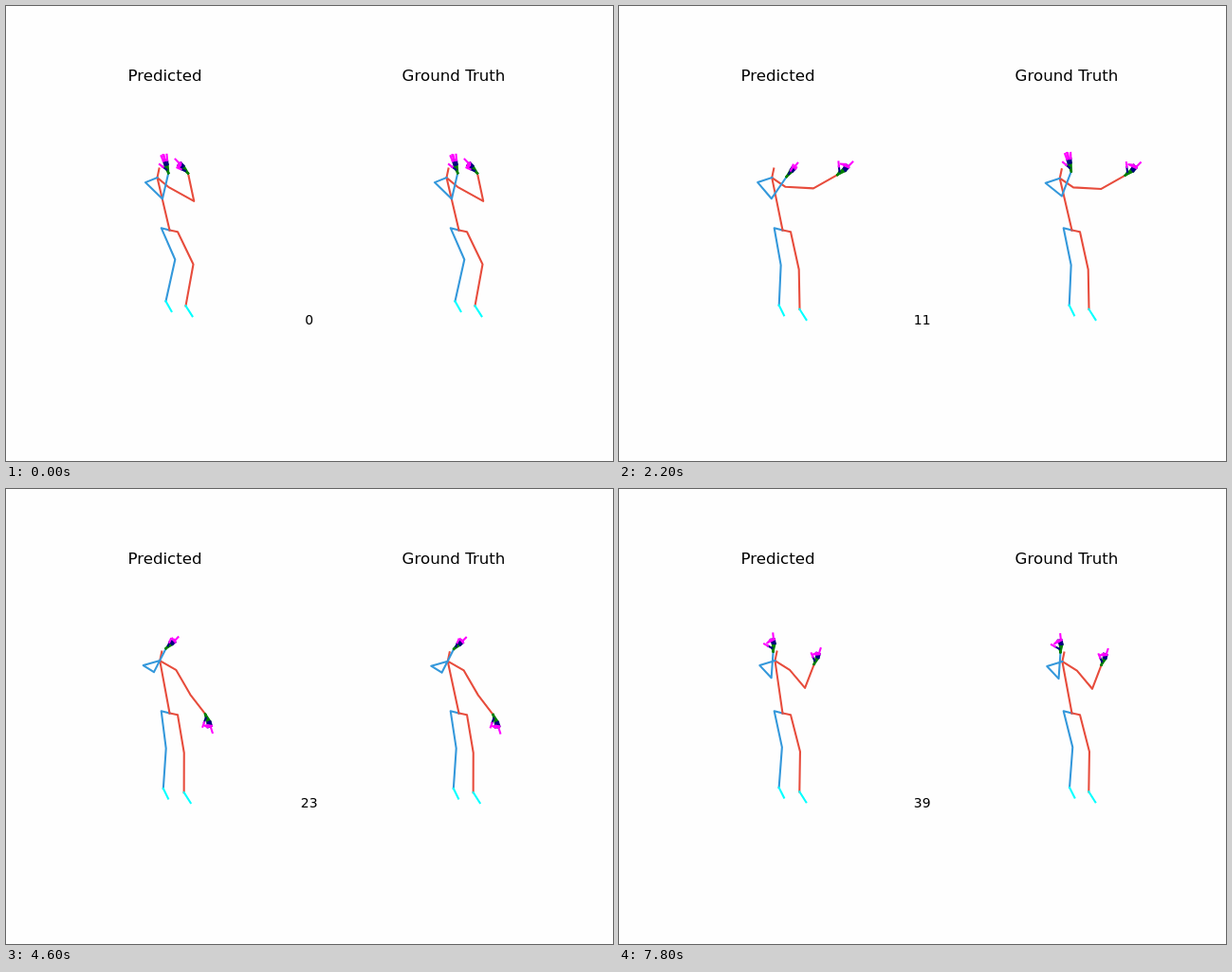
Recreate the animation shown at these times as an HTML page with a canvas. Size 640 px wide and 480 px high, loop 8 s.

```html
<!DOCTYPE html>
<html lang="en">
<head>
<meta charset="utf-8">
<title>Pose comparison</title>
<style>
html, body { margin: 0; width: 100%; height: 100%; overflow: hidden; background: #fefefe; }
canvas { display: block; }
</style>
</head>
<body>
<canvas id="stage" width="640" height="480"></canvas>
<script>
const ctx = document.getElementById("stage").getContext("2d");
const STEP = 200, STEPS = 40, PANEL_GAP = 305;
const RED = "#e74c3c", BLUE = "#3498db", CYAN = "#00ffff";
const GREEN = "#008000", NAVY = "#000080", MAGENTA = "#ff00ff";
const ROOT = [172, 236], RED_HIP = [180.5, 237.7], BLUE_HIP = [163.2, 233.7];

// Every motion below has one value per key step; angles are in degrees.
const KEY_STEPS = [0, 7, 15, 19, 27, 32, 39];
const body = {
  bend: [1, .05, .4, .35, 0, .2, .35],
  sway: [0, 1.5, .5, -2.5, -1.2, 0, .8],
  neck: [159, 160, 161.5, 162, 161.5, 160.3, 164],
  turn: [.1, .4, .7, 1, 1, 1, .75],
  drift: [0, 0, 1, 1, 0, .7, .7],
};
const redArm = {
  upper: [29, -20, 26, 60, 60, 45, 50],
  upperLen: [31, 31, 28, 30, 30, 29, 25],
  fore: [-102, -67, 8, 47, 58, -25, -69],
  foreLen: [30, 29, 29, 27, 25, 11, 27],
  hand: [-130, -61, -10, 61, 70, 60, -64],
  twist: [-.5, -1, -1.2, .8, .8, 2, -.9],
  reach: [1, 1, 1.1, 1.1, 1, .55, .9],
  open: 0,
};
const blueArm = {
  upper: [44, 39, 60, 69, -5, 44, 47],
  upperLen: [25, 22, 23, 14, 12.5, 19, 18],
  fore: [-77, -69, -42, -28, -98, -92, -86],
  foreLen: 28,
  hand: [-104, -101, 0, 8, -90, -92, -86],
  twist: [-.7, -.7, .4, .4, -1.4, -1.2, -1.2],
  reach: [1, 1, .85, 1, .75, .85, .95],
  open: [1, 1, 0, .7, 0, 0, 0],
};

function valueAt(track, step) {
  if (typeof track === "number") return track;
  let i = 0;
  while (i < KEY_STEPS.length - 2 && KEY_STEPS[i + 1] <= step) i++;
  const u = (step - KEY_STEPS[i]) / (KEY_STEPS[i + 1] - KEY_STEPS[i]);
  return track[i] + (track[i + 1] - track[i]) * u;
}

function sample(tracks, step) {
  const out = {};
  for (const name in tracks) out[name] = valueAt(tracks[name], step);
  return out;
}

const shift = ([x, y], dx, dy) => [x + dx, y + dy];
function polar([x, y], len, degrees) {
  const a = degrees * Math.PI / 180;
  return [x + len * Math.cos(a), y + len * Math.sin(a)];
}

function path(color, ...points) {
  ctx.strokeStyle = color;
  ctx.beginPath();
  for (const p of points) ctx.lineTo(...p);
  ctx.stroke();
}

function drawLeg(color, hip, knee, ankle, toe) {
  path(color, ROOT, hip, knee, ankle);
  path(CYAN, ankle, shift(ankle, ...toe));
}

// The middle fingers curl towards the thumb side; the index stays straight.
function drawHand(wrist, { hand, twist, reach, open }) {
  const at = (len, turn) => polar(wrist, len * reach, hand + turn);
  const curl = (1 - open) * twist;
  const fingers = [-1, 0, 1].map(k => [
    at(9, k * 10),
    at(13.5, k * 9 + curl * 6),
    at(11.5 + 8 * open, k * 9 + curl * 25),
  ]);
  fingers.push([at(9, 0), at(14, twist * 2), at(20, twist * 4)]);
  fingers.push([at(4, twist * 20), at(8.5, twist * 40), at(13, twist * 45)]);
  for (const [palm] of fingers) path(GREEN, wrist, palm);
  for (const [palm, knuckle] of fingers) path(NAVY, palm, knuckle);
  for (const [, knuckle, tip] of fingers) path(MAGENTA, knuckle, tip);
}

function drawArm(color, neck, shoulder, arm) {
  const elbow = polar(shoulder, arm.upperLen, arm.upper);
  const wrist = polar(elbow, arm.foreLen, arm.fore);
  path(color, neck, shoulder, elbow, wrist);
  return () => drawHand(wrist, arm);
}

// The true blue arm waits in its raised pose, then drops and catches up.
const lateStep = step => step < 7 || step > 19 ? step : 7 + 3 * Math.max(0, step - 15);

function drawFigure(step, isTruth) {
  const { bend, sway, neck: neckX, turn, drift } = sample(body, step);
  const off = isTruth ? drift : 0;
  const neck = [neckX - 3 * off, 180.6 + 1.2 * off];
  ctx.save();
  ctx.translate(isTruth ? PANEL_GAP + .5 : .5, .5);
  drawLeg(RED, RED_HIP,
    [186.3 + 10.7 * bend + sway / 2, 279 - 7 * bend],
    [189 + sway, 320.5 - 4.7 * bend], [7, 11]);
  drawLeg(BLUE, BLUE_HIP,
    [167.3 + 10.5 * bend + sway / 2 + 2 * off, 274.5 - 7.5 * bend],
    [167 + bend + sway + 2 * off, 316.5 - 5.5 * bend], [5 + bend, 10.5]);
  path(RED, ROOT, neck, shift(neck, 2, -9.5));
  const hands = [
    drawArm(RED, neck, shift(neck, 11 + 6 * turn, 9.7), sample(redArm, step)),
    drawArm(BLUE, neck, shift(neck, -12 - 5.5 * turn, 5),
      sample(blueArm, isTruth ? lateStep(step) : step)),
  ];
  for (const draw of hands) draw();
  ctx.restore();
}

function label(text, x, y, size) {
  ctx.font = `${size}px "DejaVu Sans", sans-serif`;
  ctx.fillText(text, x, y);
}

function frame(now) {
  const step = Math.floor(now / STEP) % STEPS;
  ctx.fillStyle = "#fefefe";
  ctx.fillRect(0, 0, 640, 480);
  ctx.fillStyle = "#000";
  ctx.textAlign = "center";
  label("Predicted", 167.5, 79, 16.667);
  label("Ground Truth", 472, 79, 16.667);
  label(step, 319.7, 336, 13.889);
  ctx.lineWidth = 2.08;
  ctx.lineCap = "square";
  ctx.lineJoin = "round";
  drawFigure(step, false);
  drawFigure(step, true);
}

const start = performance.now();
function tick() {
  frame(performance.now() - start);
  requestAnimationFrame(tick);
}
tick();
</script>
</body>
</html>
```
